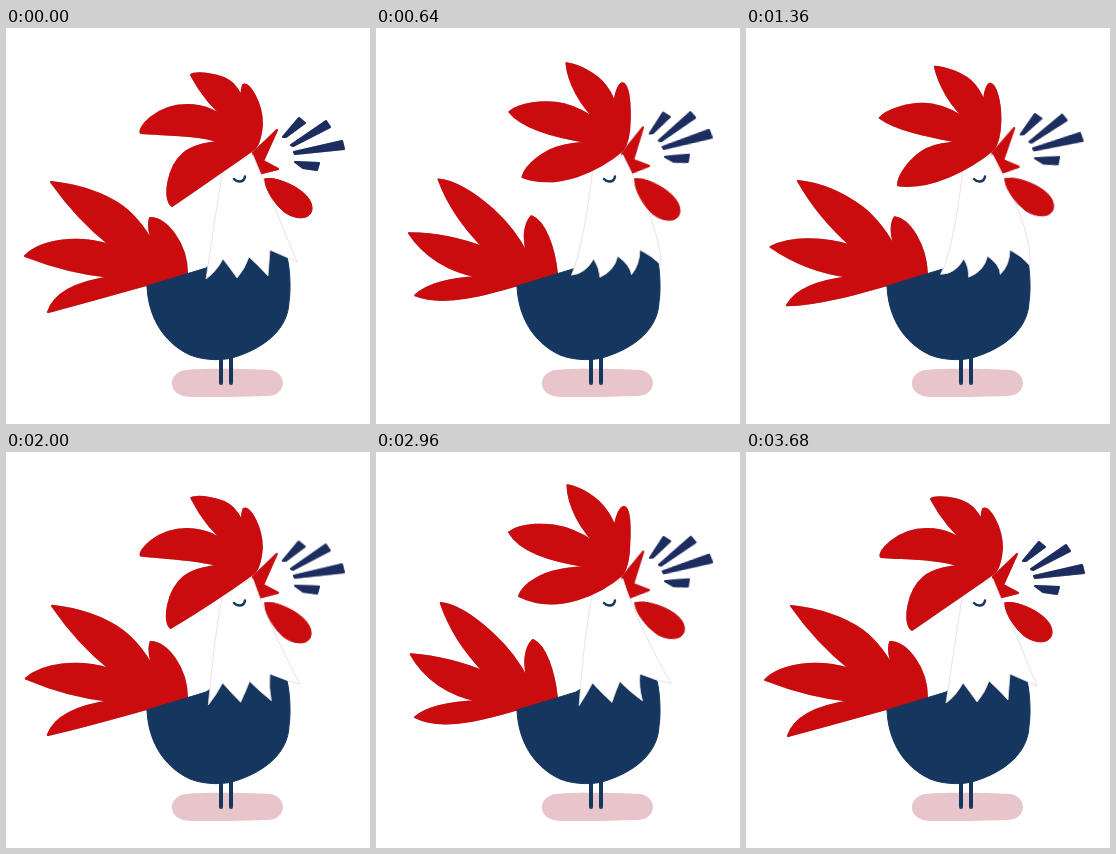
Write an HTML page that moves like this. It is 364 px wide and 396 px high and loops after 3720 ms.

```html
<!DOCTYPE html>
<html lang="en">
<head>
<meta charset="utf-8">
<title>Crowing rooster</title>
<style>
  html, body { margin: 0; width: 100%; height: 100%; overflow: hidden; background: #fff; }
  svg { display: block; }
  path { stroke-linejoin: round; stroke-linecap: round; }
  .red { fill: #cb0c0e; stroke: #cb0c0e; stroke-width: 2; }
  .navy { fill: #15365f; stroke: #15365f; }
  .lines { fill: #1c2d60; stroke: #1c2d60; stroke-width: 2; }
  .soft { filter: drop-shadow(0 0 .6px #a88f9c); }
</style>
</head>
<body>
<svg width="364" height="396" viewBox="0 0 364 396">
  <path fill="#e8c4cb" d="M180 342C205 340 240 341 264 342C281 344 282 367 262 368C235 369 208 369 184 369C160 368 161 344 180 342Z"/>
  <path d="M215 328V355M225 328V355" stroke="#15365f" stroke-width="4"/>
  <path id="tail" class="red soft"/>
  <path class="navy" d="M141 258L200 240L218 228L264 222L281 229C284 240 285 262 283 274C282 301 259 319 232 328C220 333 199 333 184 327C156 314 142 287 141 258Z"/>
  <g id="call" class="soft">
    <path class="red" d="M247 125L271 102L257 133L272 141L252 146Z"/>
    <path class="lines" d="M277 109L293 90L299 95L280 109ZM285 117L320 93L324 99L287 118ZM288 124L336 113L338 121L289 126ZM289 134L313 135L311 142L297 140Z"/>
  </g>
  <path id="neck" fill="#fff" stroke="#e6d9dc" stroke-width=".8"/>
  <path id="wattle" class="red soft" style="stroke-width: 1" d="M259 151C268 147 306 162 306 180C306 193 288 192 277 183C266 173 258 158 259 151Z"/>
  <path id="comb" class="red soft"/>
  <path d="M228 151C231 154.5 238 155 239 148.5" fill="none" stroke="#15365f" stroke-width="2.4"/>
</svg>
<script>
const LOOP = 3720;
const part = id => document.getElementById(id);

// Each pair holds the rest pose and the fully swung pose.
const tail = [
  `M42 284C48 266 70 254 105 249C72 246 45 238 19 228C35 212 70 207 104 217
   C81 199 62 178 45 154C72 157 97 165 116 178C132 190 143 206 152 225
   C144 210 141 199 144 190C160 190 181 215 181 246C135 258 88 272 42 284Z`,
  `M39 265C52 254 75 250 103 249C72 243 48 226 35 202C62 204 90 212 108 220
   C88 198 74 178 65 151C84 153 103 169 117 182C130 194 143 210 152 228
   C147 212 149 196 157 188C170 194 178 220 181 246C140 256 75 284 39 265Z`
];
const comb = [
  `M166 178C157 172 161 139 178 125C188 117 205 114 215 114C190 106 160 107 135 105
   C131 101 150 77 181 77C200 77 212 84 225 95C207 81 193 62 185 47
   C186 44 215 44 227 56C235 65 238 72 239 80C235 74 235 62 237 57
   C243 54 256 75 256 96C255 108 253 118 247 122C220 141 192 160 166 178Z`,
  `M141 141C148 125 172 119 182 118C192 116 205 115 215 115C175 110 142 98 133 78
   C146 69 173 70 190 76C204 81 214 87 225 95C203 79 192 50 192 32
   C207 35 222 46 230 58C235 65 238 70 239 78C238 72 243 57 248 55
   C255 54 254 75 253 92C253 108 250 116 247 122C225 142 180 163 141 141Z`
];
const neck = [
  `M217 140Q208 196 200 251Q210 244 217 231Q224 240 231 250Q239 241 243 229
   Q253 238 262 248Q263 235 264 222Q278 228 291 234Q270 182 247 127Z`,
  `M217 140Q208 228 193 245Q209 247 218 231Q223 240 220 249Q238 244 241 228
   Q254 236 252 246Q264 238 264 222Q275 228 282 239Q292 210 247 127Z`
];

function mix([from, to], k) {
  const ends = to.match(/\d+/g);
  let i = 0;
  return from.replace(/\d+/g, n => (+n + (ends[i++] - n) * k).toFixed(2));
}

// Sine easing between [time, value] keys.
function ease(keys, t) {
  const i = keys.findIndex(key => t < key[0]);
  const [t0, v0] = keys[i - 1], [t1, v1] = keys[i];
  return v0 + (v1 - v0) * (1 - Math.cos(Math.PI * (t - t0) / (t1 - t0))) / 2;
}

const tailKeys = [[0, 0], [830, 1], [1720, 0], [1860, 0], [2820, 1.05], [LOOP, 0]];
const combKeys = [[0, 0], [930, 1], [1860, 0], [2790, 1], [LOOP, 0]];
const neckKeys = [[0, 0], [1080, 1], [2150, -.4], [2960, -.45], [LOOP, 0]];
const callKeys = [[0, 0], [930, -9.5], [1860, 0], [2790, -7.5], [LOOP, 0]];
const wattleKeys = [[0, 0], [480, 4.5], [1500, -3.5], [2200, 3], [2960, -5], [LOOP, 0]];

function draw(now) {
  const t = now % LOOP;
  part('tail').setAttribute('d', mix(tail, ease(tailKeys, t)));
  part('comb').setAttribute('d', mix(comb, ease(combKeys, t)));
  part('neck').setAttribute('d', mix(neck, ease(neckKeys, t)));
  part('call').setAttribute('transform', `rotate(${ease(callKeys, t)} 249 132)`);
  part('wattle').setAttribute('transform', `rotate(${ease(wattleKeys, t)} 259 151)`);
}

const start = performance.now();
function tick() {
  draw(performance.now() - start);
  requestAnimationFrame(tick);
}
tick();
</script>
</body>
</html>
```
